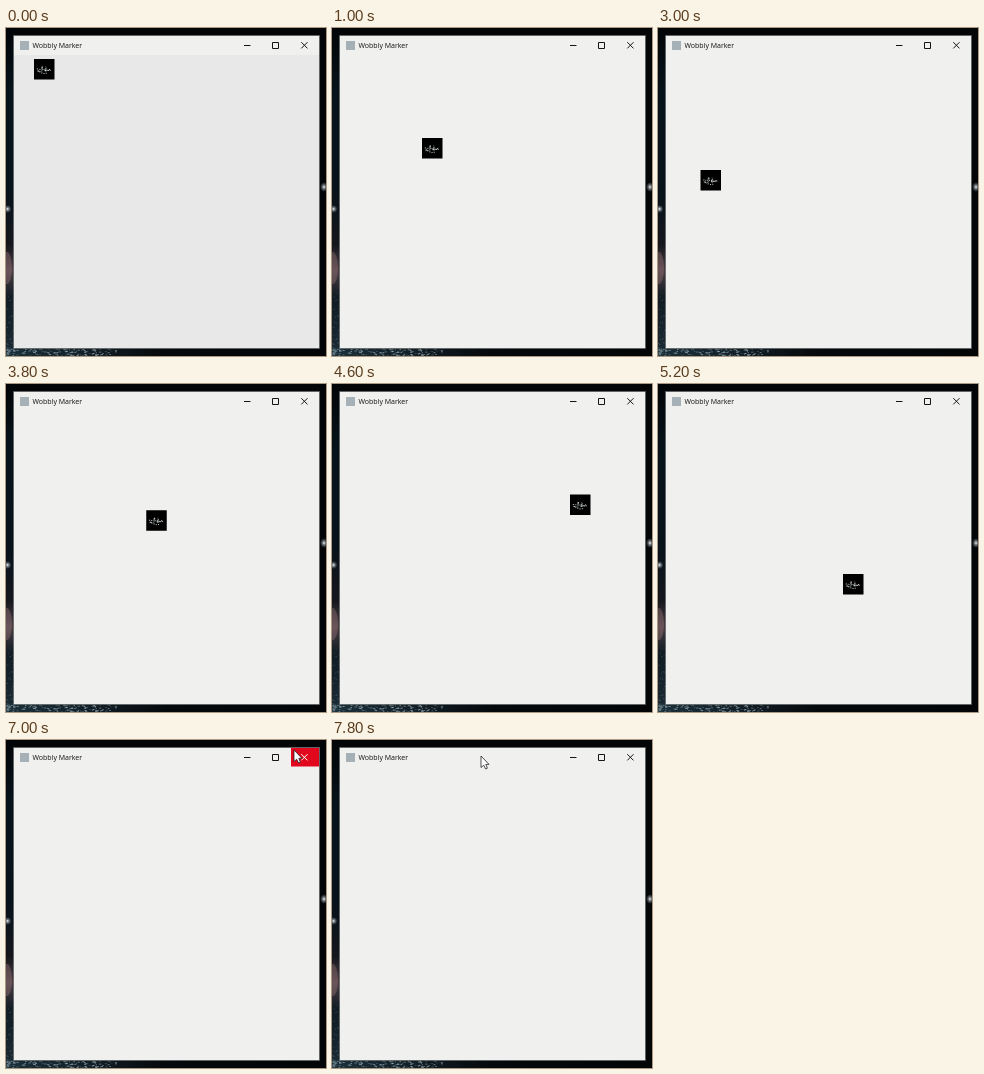
Animation, 320 px wide and 328 px high, one loop 8 s. Source, as an HTML page:

```html
<!DOCTYPE html>
<html lang="en">
<head>
<meta charset="utf-8">
<title>Custom pointer window</title>
<style>
  html, body { margin: 0; width: 100%; height: 100%; overflow: hidden; background: #030608; }
  svg { display: block; width: 100%; height: 100%; }
  text { font: 7px "Open Sans", "Noto Sans", sans-serif; fill: #111; }
</style>
</head>
<body>
<svg viewBox="0 0 320 328">
  <defs>
    <linearGradient id="leftSide" x2="0" y2="1">
      <stop offset="0" stop-color="#020507"/>
      <stop offset=".2" stop-color="#07131b"/>
      <stop offset=".5" stop-color="#08121a"/>
      <stop offset=".66" stop-color="#15171d"/>
      <stop offset=".74" stop-color="#4b3d43"/>
      <stop offset=".82" stop-color="#111c24"/>
      <stop offset="1" stop-color="#1b2b35"/>
    </linearGradient>
    <linearGradient id="floor">
      <stop offset="0" stop-color="#1c303a"/>
      <stop offset=".3" stop-color="#101b22"/>
      <stop offset=".5" stop-color="#05090c"/>
      <stop offset="1" stop-color="#030507"/>
    </linearGradient>
    <radialGradient id="glow">
      <stop offset="0" stop-color="#fff"/>
      <stop offset=".3" stop-color="#b9c2c6" stop-opacity=".7"/>
      <stop offset="1" stop-color="#789" stop-opacity="0"/>
    </radialGradient>
  </defs>

  <rect width="320" height="328" fill="#030507"/>
  <rect width="9" height="328" fill="url(#leftSide)"/>
  <rect y="319" width="320" height="9" fill="url(#floor)"/>
  <ellipse cx="1" cy="240" rx="5" ry="16" fill="#b78d90" opacity=".3"/>
  <circle cx="1.5" cy="181" r="4" fill="url(#glow)"/>
  <ellipse cx="318" cy="159" rx="4" ry="5" fill="url(#glow)"/>
  <g id="rain"></g>

  <rect x="7.5" y="7.5" width="306" height="313" fill="#f0f0ee" stroke="#525759" stroke-width=".6"/>
  <rect id="pane" x="8" y="27" width="305" height="293" fill="#f0f0ee"/>
  <rect x="14" y="13" width="9" height="9" fill="#a5b0b7"/>
  <text x="26.5" y="20.3">Wobbly Marker</text>

  <rect id="hover" x="285" y="8" width="28" height="18.5" fill="#e1081d"/>
  <g fill="none" stroke="#151515">
    <path d="M238 17.5h6.5M266.5 14.5h6v6h-6z"/>
    <path id="cross" d="M295.3 14.2l6.2 6.2m0-6.2l-6.2 6.2"/>
  </g>

  <g id="tile"><rect width="20.5" height="20.5" fill="#010101"/></g>
  <path id="arrow" d="M0 0V11.5L2.7 9.2L4.6 13L6.4 12.2L4.8 8.4H8Z"
        fill="#fff" stroke="#222" stroke-width=".8" stroke-linejoin="round"/>
</svg>
<script>
const $ = id => document.getElementById(id);
const LOOP = 8000, STEP = 200, TITLE_BOTTOM = 27;

// time, x, y of the pointer's hot spot
const path = [
  [0, 28, 31], [200, 28, 31], [1000, 90, 110], [2000, 50, 18.5],
  [3000, 42.5, 142], [4600, 238, 110.5], [5200, 185, 190],
  [5800, 230, 112], [7000, 288, 10], [7800, 149, 16]
];

let seed = 7;
const random = () => (seed = seed * 16807 % 2147483647) / 2147483647;

function speck(parent, x, y, w, h, fill, opacity) {
  const el = document.createElementNS(parent.namespaceURI, 'rect');
  const attrs = { x, y, width: w, height: h, fill, opacity };
  for (const name in attrs) el.setAttribute(name, attrs[name]);
  parent.append(el);
}

// wet ground, brightest at the lower left
for (let i = 0; i < 150; i++) {
  const x = 110 * random() ** 1.7;
  speck($('rain'), x, 320.5 + 7 * random(), 0.6 + 2 * random(), 0.8, '#b9d2dc', 0.15 + 0.65 * random());
}
for (let i = 0; i < 35; i++) {
  speck($('rain'), 8 * random(), 265 + 55 * random(), 1.2, 0.8, '#8fa8b4', 0.1 + 0.35 * random());
}

// faint sparkle in the middle of the tile
for (let i = 0; i < 34; i++) {
  const a = 2 * Math.PI * random(), r = Math.sqrt(random());
  speck($('tile'), 9 + 7 * r * Math.cos(a), 10.5 + 3.6 * r * Math.sin(a), 1.1, 0.9, '#e6eeee', 0.35 + 0.6 * random());
}

function pointerAt(t) {
  const next = path.findIndex(p => p[0] > t);
  if (next < 0) return path[path.length - 1].slice(1);
  const [t0, x0, y0] = path[next - 1], [t1, x1, y1] = path[next];
  const u = (t - t0) / (t1 - t0), k = u * u * (3 - 2 * u);
  return [x0 + (x1 - x0) * k, y0 + (y1 - y0) * k];
}

const show = (el, on) => el.setAttribute('visibility', on ? 'visible' : 'hidden');

function draw(time) {
  const t = Math.floor(time % LOOP / STEP) * STEP;
  const [x, y] = pointerAt(t);
  const inTitle = y < TITLE_BOTTOM, closing = inTitle && x >= 285;
  for (const id of ['tile', 'arrow']) $(id).setAttribute('transform', `translate(${x} ${y})`);
  show($('tile'), !inTitle);
  show($('arrow'), inTitle);
  show($('hover'), closing);
  $('cross').setAttribute('stroke', closing ? '#fff' : '#151515');
  $('pane').setAttribute('fill', t < 400 ? '#e8e8e8' : '#f0f0ee');
}

const start = performance.now();
function tick() {
  draw(performance.now() - start);
  requestAnimationFrame(tick);
}
tick();
</script>
</body>
</html>
```
